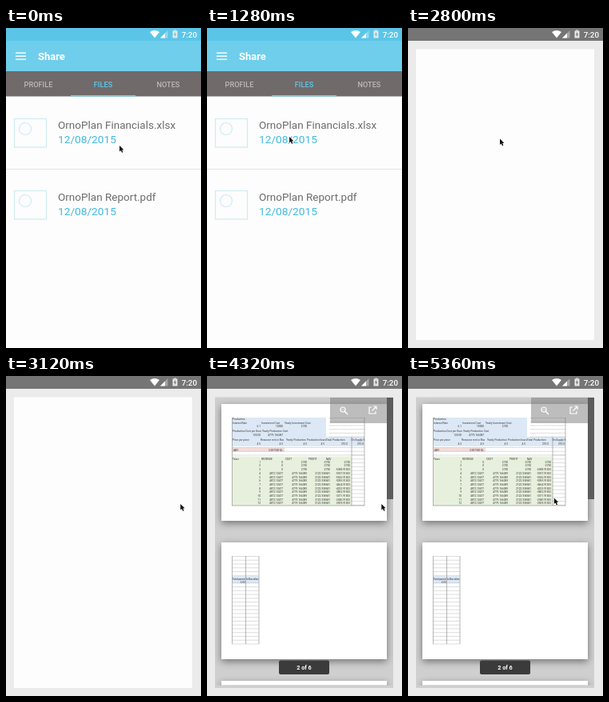
An HTML page with a canvas that plays this animation: 244x400 px, repeating every 5440 ms.

```html
<!DOCTYPE html>
<html lang="en">
<head>
<meta charset="utf-8">
<title>File preview</title>
<style>
html, body { margin: 0; width: 100%; height: 100%; overflow: hidden; background: #ebebeb; }
canvas { display: block; width: 244px; height: 400px; }
</style>
</head>
<body>
<canvas id="stage"></canvas>
<script>
const LOOP = 5440, STEP = 80;
const canvas = document.getElementById('stage');
const scale = window.devicePixelRatio || 1;
canvas.width = 244 * scale;
canvas.height = 400 * scale;
const ctx = canvas.getContext('2d');

const clamp = x => Math.max(0, Math.min(1, x));
const ease = x => x * x * (3 - 2 * x);

function rect(x, y, w, h, color) {
  ctx.fillStyle = color;
  ctx.fillRect(x, y, w, h);
}
function text(str, x, y, size, color, align = 'left', weight = 400) {
  ctx.font = `${weight} ${size}px Roboto, "Open Sans", sans-serif`;
  ctx.textAlign = align;
  ctx.fillStyle = color;
  ctx.fillText(str, x, y);
}
function line(points, color, width = 1, dash = []) {
  ctx.beginPath();
  points.forEach(([x, y]) => ctx.lineTo(x, y));
  ctx.strokeStyle = color;
  ctx.lineWidth = width;
  ctx.setLineDash(dash);
  ctx.stroke();
  ctx.setLineDash([]);
}
function shape(points, color) {
  ctx.beginPath();
  points.forEach(([x, y]) => ctx.lineTo(x, y));
  ctx.closePath();
  ctx.fillStyle = color;
  ctx.fill();
}
function circle(x, y, r, color, width) {
  ctx.beginPath();
  ctx.arc(x, y, r, 0, 2 * Math.PI);
  ctx.strokeStyle = color;
  ctx.lineWidth = width;
  ctx.stroke();
}

function statusBar(color) {
  rect(0, 0, 244, 16, color);
  ctx.beginPath();
  ctx.moveTo(186, 12.5);
  ctx.lineTo(180, 5);
  ctx.quadraticCurveTo(186, 0.8, 192, 5);
  ctx.fillStyle = '#fff';
  ctx.fill();
  shape([[193, 12.5], [202.5, 12.5], [202.5, 3]], 'rgba(255,255,255,.35)');
  shape([[193, 12.5], [199, 12.5], [199, 6.5]], '#fff');
  rect(208.5, 3.5, 6, 9, '#e8e8e8');
  rect(210, 2.5, 3, 1, '#e8e8e8');
  shape([[212, 4.5], [209.8, 8.5], [211.2, 8.5], [210.8, 11.5], [213.2, 7.4], [211.8, 7.4]], color);
  text('7:20', 239, 11.7, 9.8, '#fff', 'right', 500);
}

function fileRow(top, name) {
  ctx.strokeStyle = '#cfebf2';
  ctx.lineWidth = 1.2;
  ctx.strokeRect(10.5, top + .5, 40, 35.5);
  circle(24, top + 13, 7.5, '#cfebf2', 1.2);
  text(name, 65, top + 12.7, 13.5, '#6c6c6c');
  text('12/08/2015', 65, top + 31, 13.7, '#41b9dd');
}

function fileList() {
  rect(0, 0, 244, 400, '#fdfdfd');
  rect(0, 16, 244, 38, '#6fceec');
  statusBar('#5bc5e8');
  for (const y of [30.5, 34.5, 38.5]) rect(12, y, 13, 1.4, '#fff');
  text('Share', 40, 40, 13, '#fff', 'left', 700);
  rect(0, 54, 244, 31.5, '#706a6a');
  text('PROFILE', 40.5, 73.7, 9.2, '#bdb9b9', 'center', 500);
  text('FILES', 121.5, 73.7, 9.2, '#5ec9e9', 'center', 500);
  text('NOTES', 203, 73.7, 9.2, '#bdb9b9', 'center', 500);
  rect(81, 84, 81, 1.5, '#72cfea');
  fileRow(113, 'OrnoPlan Financials.xlsx');
  rect(0, 176, 244, 1, '#e4e4e4');
  fileRow(203, 'OrnoPlan Report.pdf');
}

function paper(y, height = 146) {
  ctx.save();
  ctx.shadowColor = 'rgba(0,0,0,.45)';
  ctx.shadowBlur = 9 * scale;
  ctx.shadowOffsetY = 3 * scale;
  rect(18, y, 207, height, '#fff');
  ctx.restore();
}

function dottedGrid(x, y, w, rows, pitch) {
  for (let i = 0; i <= rows; i++)
    line([[x, y + i * pitch], [x + w, y + i * pitch]], '#a8a8a8', .6, [1.2, .6]);
}

function sheet() {
  const small = (s, x, y, align) => text(s, x, y, 3.2, '#333', align);
  rect(31, 52, 118, 36, '#dce8f5');
  rect(149, 76, 48, 12, '#dce8f5');
  rect(31, 89.5, 66, 5, '#f6dcda');
  rect(31, 100.5, 150, 61.5, '#e7f0dc');
  dottedGrid(153, 52.5, 44, 5, 4.7);
  dottedGrid(31, 89.5, 166, 2, 4.7);
  dottedGrid(181, 99, 16, 13, 4.8);
  for (const x of [31.5, 197]) line([[x, 52], [x, 162]], '#888', .6);
  line([[181, 76], [181, 162]], '#888', .6);
  line([[31, 162], [197, 162]], '#888', .6);

  small('Production', 32, 55);
  small('Interest Rate', 32, 59.5);
  small('Investment Cost', 68, 59.5);
  small('Yearly Investment Cost', 97, 59.5);
  small('6.1', 67, 64, 'right');
  small('10000', 95, 64, 'right');
  small('2750', 125, 64, 'right');
  small('Production Cost per Guru', 32, 70);
  small('Yearly Production Cost', 69, 70);
  small('120.00', 67, 74.5, 'right');
  small('4779.166087', 95, 74.5, 'right');
  [['Price per piece', 32], ['Resource rent in Box', 67], ['Yearly Production', 99],
   ['Production hours', 125], ['Total Production', 149], ['On Supply 5', 180.5]]
    .forEach(([s, x]) => small(s, x, 80.5));
  [67, 95, 125, 147, 176, 196].forEach((x, i) => small(i < 4 ? '4.5' : '210.0', x, 85.5, 'right'));
  small('ANY', 33, 93.5);
  small('3.287300 QL', 95, 93.5, 'right');
  ['Years', 'REVENUE', 'COST', 'PROFIT', 'NAV']
    .forEach((s, i) => small(s, [32, 68, 98, 127, 149][i], 104.5));
  for (let i = 0; i < 12; i++) {
    const y = 108.7 + i * 4.7;
    small(i + 1, 67, y, 'right');
    small(i < 3 ? '0' : '4872.10477', 95, y, 'right');
    small(i < 3 ? '2750' : '4779.166089', 125, y, 'right');
    small(i < 3 ? '-2750' : '2122.938681', 154, y, 'right');
    small(i < 2 ? '-2750' : '-' + (7250 - i * 431) + '.91833', 179, y, 'right');
  }
}

function smallTable() {
  rect(31, 250, 34, 9, '#dce8f5');
  dottedGrid(31, 225.5, 34, 23, 4.76);
  for (const x of [31.5, 48.5, 65]) line([[x, 225], [x, 335]], '#999', .7);
  text('Total period', 32, 255, 2.9, '#333');
  text('In Box other', 49, 255, 2.9, '#333');
  text('0.00', 47.5, 259, 2.9, '#333', 'right');
}

function pages() {
  ctx.save();
  ctx.beginPath();
  ctx.rect(10, 27, 223, 359.5);
  ctx.clip();
  paper(35);
  sheet();
  paper(208);
  smallTable();
  paper(381, 20);
  rect(225, 27, 8, 127, '#5c5c5c');
  ctx.beginPath();
  ctx.roundRect(90, 355.5, 63, 17.5, 2);
  ctx.fillStyle = '#3b3b3b';
  ctx.fill();
  text('2 of 6', 121.5, 367, 7.2, '#fff', 'center', 700);
  ctx.restore();
}

function toolbar(expanded) {
  const left = expanded ? 154 : 189.5;
  rect(left, 27, 225 - left, 32, 'rgba(110,110,110,.45)');
  if (!expanded) return;
  circle(170, 42, 3, '#fff', 1.2);
  line([[172.3, 44.3], [176, 48]], '#fff', 1.5);
  line([[168.7, 42], [171.3, 42]], '#fff', .7);
  line([[206, 39], [203, 39], [203, 47], [211, 47], [211, 44]], '#fff', 1.2);
  line([[206.5, 43.5], [211.5, 38.5]], '#fff', 1.2);
  line([[208, 38], [212, 38], [212, 42]], '#fff', 1.2);
}

function viewer(t) {
  rect(0, 0, 244, 400, '#ebebeb');
  statusBar('#757575');
  const fill = t < 2800 ? '#fbfcf7' : t < 3440 ? '#fdfdfd' : '#cfcfcf';
  rect(10, 26.5, 223, 363.5, fill);
  if (t >= 4320) pages();
  if (t >= 3440) toolbar(t >= 3600);
}

// Each move: start time, end time, destination.
const moves = [[80, 1120, 103, 136], [2720, 3120, 218.3, 160], [4560, 5360, 182.8, 152.5]];
function pointer(t) {
  let x = 142, y = 147;
  for (const [start, end, toX, toY] of moves) {
    const p = ease(clamp((t - start) / (end - start)));
    x += (toX - x) * p;
    y += (toY - y) * p;
  }
  const outline = [[0, 0], [0, 7.4], [1.7, 5.9], [3, 8.8], [4.4, 8.2], [3.1, 5.4], [5.3, 5.3]]
    .map(([dx, dy]) => [x + dx, y + dy]);
  line([...outline, outline[0]], 'rgba(255,255,255,.8)', 1);
  shape(outline, '#111');
}

function draw(now) {
  const t = Math.floor(now % LOOP / STEP) * STEP;
  ctx.setTransform(scale, 0, 0, scale, 0, 0);
  if (t < 1520) fileList();
  if (t > 1280) {
    ctx.globalAlpha = clamp((t - 1280) / 240);
    viewer(t);
    ctx.globalAlpha = 1;
  }
  pointer(t);
}

const start = performance.now();
function tick() {
  draw(performance.now() - start);
  requestAnimationFrame(tick);
}
tick();
</script>
</body>
</html>
```
